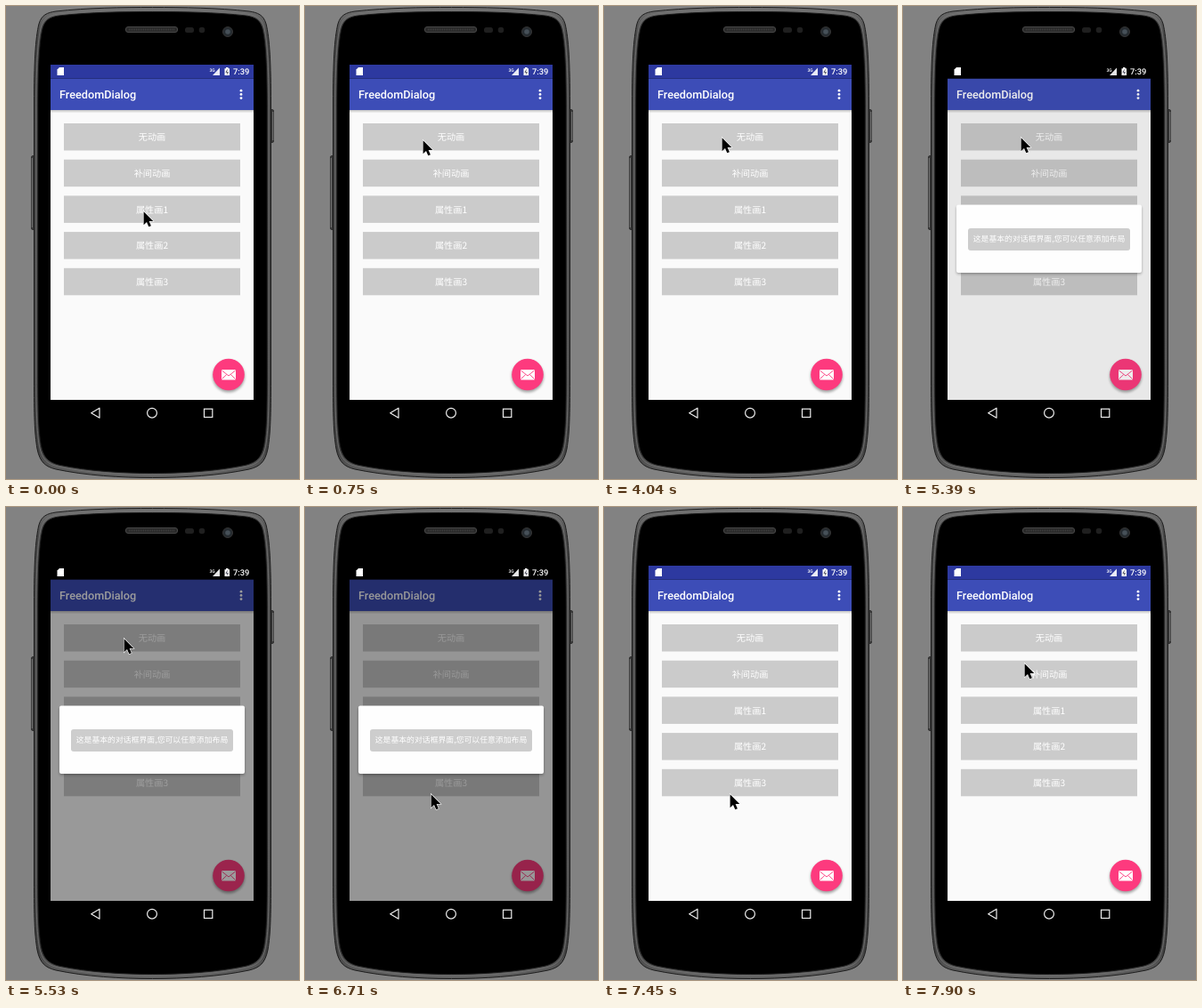
Animation, 329 px wide and 532 px high, one loop 8 s. Source, as an HTML page:

```html
<!DOCTYPE html>
<html lang="en">
<head>
<meta charset="utf-8">
<style>
  html, body { margin: 0; width: 100%; height: 100%; overflow: hidden; background: #828282; }
  svg { display: block; width: 100%; height: 100%; }
  text { fill: #fff; text-rendering: geometricPrecision; }
  .roboto { font-family: Roboto, sans-serif; font-weight: 500; }
  .cjk { font-family: "Noto Sans CJK SC", "Noto Sans CJK", sans-serif; text-anchor: middle; }
</style>
</head>
<body>
<svg viewBox="0 0 329 532">
  <defs>
    <path id="shell" d="M31.5 110C31.5 65 33 36 37 20C40 10 46 7.5 56 6C92 2 130 1.5 164.5 1.5S237 2 273 6C283 7.500 289 10 292 20C296 36 297.500 65 297.500 110V420C297.500 460 297 480 294 498C291 513 285 518 273 521C240 528 200 530.500 164.500 530.500S89 528 56 521C44 518 38 513 35 498C32 480 31.500 460 31.500 420Z"/>
    <linearGradient id="metal" x2="0" y2="1">
      <stop offset="0" stop-color="#727272"/>
      <stop offset=".06" stop-color="#484848"/>
      <stop offset=".94" stop-color="#424242"/>
      <stop offset="1" stop-color="#636363"/>
    </linearGradient>
    <linearGradient id="fade" x2="0" y2="1">
      <stop offset="0" stop-opacity=".22"/>
      <stop offset="1" stop-opacity="0"/>
    </linearGradient>
    <filter id="soft" x="-30%" y="-30%" width="160%" height="160%">
      <feGaussianBlur stdDeviation="1.6"/>
    </filter>
  </defs>

  <!-- Phone -->
  <g fill="#3c3c3c" stroke="#202020" stroke-width=".7">
    <rect x="28.500" y="168.500" width="4" height="83" rx="1.500"/>
    <rect x="296.500" y="116.500" width="4" height="37" rx="1.500"/>
  </g>
  <path d="M29.300 171V249M299.800 119V151" stroke="#999" stroke-width=".7"/>
  <use href="#shell" fill="url(#metal)" stroke="#1c1c1c"/>
  <use href="#shell" transform="translate(164.500 266) scale(.981 .988) translate(-164.500 -266)" fill="none" stroke="#777" stroke-width=".8"/>
  <use href="#shell" transform="translate(164.500 266) scale(.967 .981) translate(-164.500 -266)" stroke="#181818"/>
  <rect x="134.500" y="23.500" width="58" height="6" rx="2.500" fill="#292929" stroke="#484848"/>
  <path d="M138 26.500H189" stroke="#414141" stroke-width="2" stroke-dasharray="1 1"/>
  <rect x="201" y="24" width="10" height="6" rx="2.500" fill="#1f1f1f"/>
  <circle cx="220" cy="27" r="3.300" fill="#1f1f1f"/>
  <circle cx="249" cy="29" r="5.500" fill="#252b30" stroke="#343434"/>
  <circle cx="249" cy="29" r="2.800" fill="#465058"/>

  <!-- App -->
  <rect x="50" y="82" width="228" height="361" fill="#fafafa"/>
  <rect x="50" y="117" width="228" height="3.500" fill="url(#fade)"/>
  <rect x="50" y="81.500" width="228" height="35.500" fill="#3d4db7"/>
  <text class="roboto" x="60" y="104" font-size="12.700">FreedomDialog</text>
  <g fill="#fff">
    <circle cx="264" cy="95.200" r="1.400"/>
    <circle cx="264" cy="99.400" r="1.400"/>
    <circle cx="264" cy="103.600" r="1.400"/>
  </g>
  <g id="buttons"></g>
  <circle cx="250" cy="416.500" r="18" opacity=".35" filter="url(#soft)"/>
  <circle cx="250" cy="414.500" r="17.800" fill="#fd3a7e"/>
  <rect x="242" y="409" width="16" height="11.500" rx="1" fill="#fff"/>
  <path d="M242.500 410L250 416L257.500 410M242.500 419.500L247.700 414.500M257.500 419.500L252.300 414.500" fill="none" stroke="#fd3a7e" stroke-width=".9"/>
  <rect id="dim" x="50" y="81.500" width="228" height="361.500"/>

  <!-- System bars -->
  <rect id="status" x="50" y="66" width="228" height="15.500"/>
  <g fill="#fff">
    <path d="M60 69H65V78H57.500V71.500Z"/>
    <path d="M240 69.500V78H232Z" opacity=".9"/>
    <path d="M245.500 70.300H247V69H249.500V70.300H251V78H245.500Z"/>
  </g>
  <path d="M248.700 71.500L247 74.500H249.500L247.900 77" fill="none" stroke="#334" stroke-width=".8"/>
  <text class="roboto" x="228.500" y="73.500" font-size="5">3G</text>
  <text class="roboto" x="255" y="77.300" font-size="9.300">7:39</text>
  <rect x="50" y="443" width="228" height="31"/>
  <g fill="none" stroke="#eee" stroke-width="1.200">
    <path d="M105 452.200V463.200L95.700 457.700Z" stroke-linejoin="round"/>
    <circle cx="164" cy="457.700" r="5.400"/>
    <rect x="222.500" y="453.200" width="9.300" height="9.300"/>
  </g>

  <g id="dialog">
    <rect x="60" y="225.500" width="208" height="76" rx="2" opacity=".3" filter="url(#soft)"/>
    <rect x="60" y="223.500" width="208" height="76.500" rx="2" fill="#fefefe"/>
    <rect x="73" y="250" width="182" height="25" rx="3" fill="#cdcdcd"/>
    <text class="cjk" x="164" y="265.300" font-size="8.850">这是基本的对话框界面,您可以任意添加布局</text>
  </g>

  <path id="cursor" d="M.6 1.200V16.200L4 13L6.300 18.300L8.900 17.200L6.600 12H11.300Z" stroke="#fff" stroke-width="1.100" paint-order="stroke"/>
</svg>
<script>
  const LOOP = 8000;
  const byId = id => document.getElementById(id);

  byId("buttons").innerHTML = ["无动画", "补间动画", "属性画1", "属性画2", "属性画3"].map((label, i) => {
    const y = 132 + i * 40.7;
    return `<rect x="65" y="${y}" width="198" height="30.500" fill="#cbcbcb"/>
      <text class="cjk" x="164" y="${y + 19.2}" font-size="10.200">${label}</text>`;
  }).join("");

  // [start ms, x, y]
  const cursorSteps = [
    [0, 154, 230], [150, 127, 125], [300, 123, 110], [450, 127, 131], [600, 131, 146],
    [750, 132, 150], [2400, 132, 149], [2840, 132, 148], [4040, 132, 147],
    [5970, 131, 161], [6120, 132, 182], [6270, 138, 297], [6410, 138, 320],
    [6560, 139, 321], [6710, 141, 322], [7600, 141, 301], [7750, 136, 197], [7900, 136, 175]
  ];
  // [start ms, status bar colour, dim opacity, dialog shown]
  const screenSteps = [
    [0, "#2d39a0", 0, false],
    [5240, "#000", 0, false],
    [5390, "#000", .07, true],
    [5530, "#000", .39, true],
    [5680, "#000", .405, true],
    [7300, "#080919", .32, false],
    [7450, "#2d39a0", 0, false]
  ];
  const stepAt = (steps, time) => steps.findLast(([start]) => start <= time);

  function draw() {
    const time = performance.now() % LOOP;
    const [, x, y] = stepAt(cursorSteps, time);
    const [, statusColor, dim, open] = stepAt(screenSteps, time);
    byId("cursor").setAttribute("transform", `translate(${x} ${y})`);
    byId("status").setAttribute("fill", statusColor);
    byId("dim").setAttribute("opacity", dim);
    byId("dialog").setAttribute("visibility", open ? "visible" : "hidden");
    requestAnimationFrame(draw);
  }
  draw();
</script>
</body>
</html>
```
